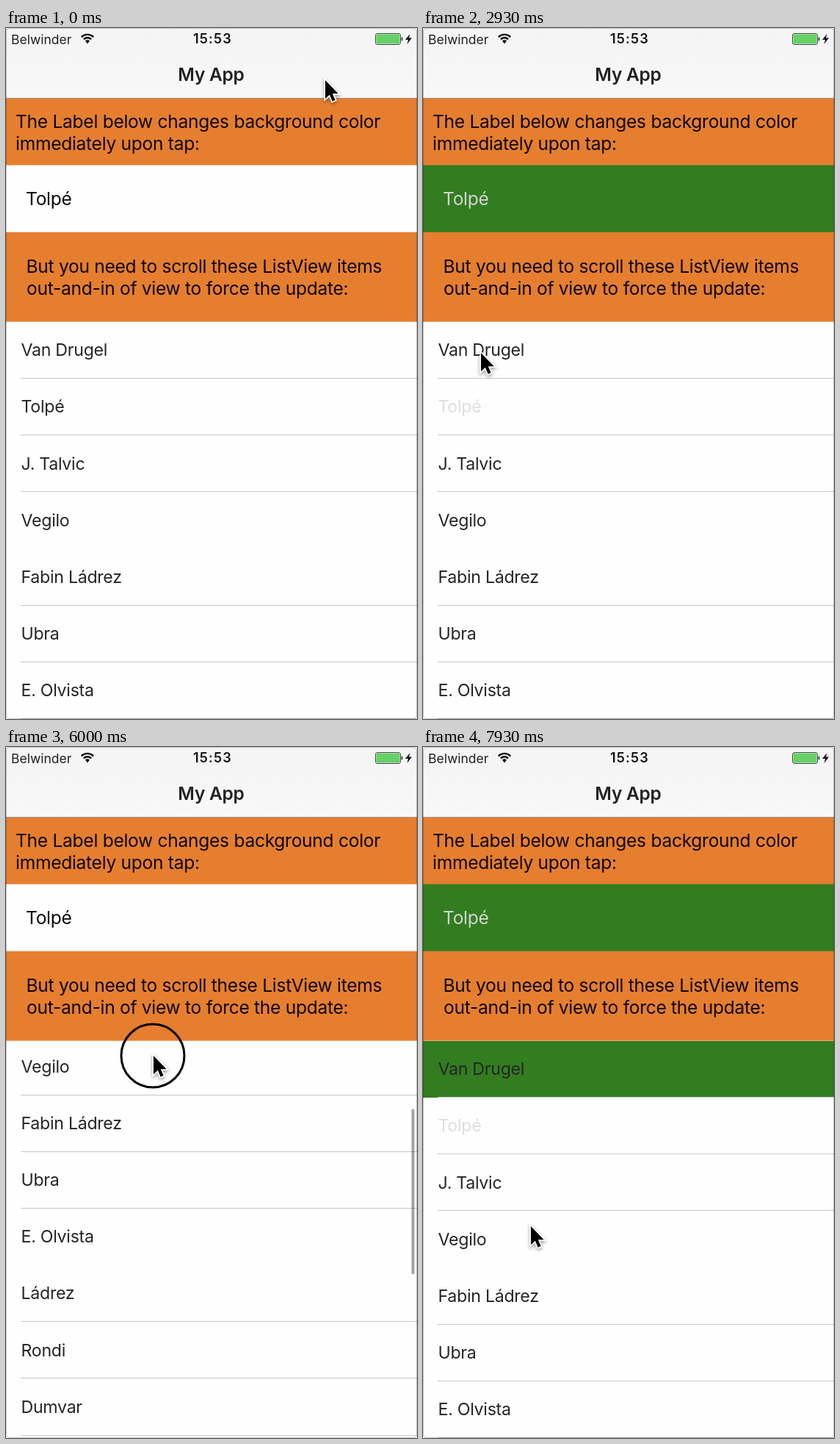
Animation of 560x940 px, one loop 8 s. Source, as an HTML page with a canvas:

```html
<!DOCTYPE html>
<html lang="en">
<head>
<meta charset="utf-8">
<title>My App</title>
<style>
  html, body { margin: 0; width: 100%; height: 100%; overflow: hidden; background: #fff; }
  canvas { display: block; width: 560px; height: 940px; }
</style>
</head>
<body>
<canvas id="stage" width="560" height="940"></canvas>
<script>
const ctx = document.getElementById('stage').getContext('2d');
const W = 560, H = 940, LOOP = 8000, STEP = 1000 / 15;
const ORANGE = '#e67e2f', GREEN = '#327d20', INK = '#252525', FADED = '#dedede', PALE = '#d3d6d0';
const BAR_END = 96, LABEL_TOP = 186.6, HINT_TOP = 277.7, LIST_TOP = 399.7, ROW = 77.17;
const players = ['Van Drugel', 'Tolpé', 'J. Talvic', 'Vegilo', 'Fabin Ládrez',
                 'Ubra', 'E. Olvista', 'Ládrez', 'Rondi', 'Dumvar'];

// Where the pointer rests, and when it sets off for each place
const home = { x: 435, y: 71 };
const grip = { at: 4560, x: 190, y: 666 };
const moves = [
  { at: 700, x: 68, y: 224 },
  { at: 2200, x: 79, y: 442 },
  grip,
  { at: 5270, x: 201, y: 420 },
  { at: 6060, x: 185, y: 710 },
  { at: 7000, x: 128, y: 513 },
  { at: 7530, x: 147, y: 652 }
];
const taps = [{ at: 1800, row: 1 }, { at: 3730, row: 0 }, { at: 7350, row: 1 }];
const TAP = 130;
const drag = { press: 5130, start: 5270, end: 6500, slop: 11, rubber: 0.53 };

const clamp = v => Math.min(1, Math.max(0, v));
const smooth = v => v * v * (3 - 2 * v);

function pointerAt(t) {
  let from = home, pos = home;
  for (const to of moves) {
    if (t < to.at) break;
    const dx = to.x - from.x, dy = to.y - from.y;
    const k = smooth(clamp((t - to.at) / (150 + 0.9 * Math.hypot(dx, dy))));
    pos = { x: from.x + dx * k, y: from.y + dy * k };
    from = to;
  }
  return pos;
}

// Positive: scrolled down; negative: pulled past the top
function scrollAt(t) {
  if (t < drag.start) return 0;
  const held = Math.min(t, drag.end);
  const moved = grip.y - pointerAt(held).y - drag.slop * clamp((held - drag.start) / 400);
  const offset = moved > 0 ? moved : moved * drag.rubber;
  const s = (t - held) / 75;
  return offset * (1 + s) * Math.exp(-s);
}

function selectedAt(t) {
  return taps.reduce((row, tap) => t >= tap.at + TAP ? tap.row : row, -1);
}

function isPressed(t) {
  return t >= drag.press && t < drag.end || taps.some(({ at }) => t >= at && t < at + TAP);
}

function rect(x, y, w, h, color) {
  ctx.fillStyle = color;
  ctx.fillRect(x, y, w, h);
}

function roundRect(x, y, w, h, r) {
  ctx.beginPath();
  ctx.roundRect(x, y, w, h, r);
}

function text(str, x, y, size, color, weight = 400, spacing = -0.3, align = 'left') {
  ctx.font = `${weight} ${size}px Inter, Roboto, sans-serif`;
  ctx.letterSpacing = spacing + 'px';
  ctx.textAlign = align;
  ctx.fillStyle = color;
  ctx.fillText(str, x, y);
}

function drawWifi(x, y) {
  const wave = r => ctx.arc(x, y, r, -Math.PI * 0.75, -Math.PI * 0.25);
  ctx.strokeStyle = ctx.fillStyle = '#111';
  ctx.lineWidth = 2.4;
  for (const r of [7.2, 11.6]) {
    ctx.beginPath();
    wave(r);
    ctx.stroke();
  }
  ctx.beginPath();
  ctx.moveTo(x, y + 1);
  wave(4.2);
  ctx.fill();
}

const bolt = new Path2D('M550.5 8 L544 16 H548 L546.5 22 L553 13.5 H549 Z');

function drawBattery() {
  ctx.lineWidth = 1;
  ctx.strokeStyle = ctx.fillStyle = '#4a4a4a';
  roundRect(503.5, 7.5, 34, 15, 2.5);
  ctx.stroke();
  roundRect(538.5, 12.5, 2, 5, 1);
  ctx.fill();
  rect(504.5, 8.5, 32, 13, '#66d166');
  ctx.fillStyle = '#111';
  ctx.fill(bolt);
}

function drawBar() {
  const shade = ctx.createLinearGradient(0, 0, 0, BAR_END);
  shade.addColorStop(0, '#f4f4f4');
  shade.addColorStop(1, '#f8f8f8');
  rect(0, 0, W, BAR_END, shade);
  rect(0, BAR_END - 1, W, 1, '#a29a94');
  text('Belwinder', 7, 21.5, 17.5, '#222', 400, 0);
  text('15:53', 281.5, 21.3, 18.2, '#151515', 600, 1.1, 'center');
  text('My App', 279.5, 72, 24.6, '#222', 600, -0.3, 'center');
  drawWifi(111, 20.5);
  drawBattery();
}

function drawHeader(selected) {
  const on = selected === 1;
  const line = (str, x, y) => text(str, x, y, 24.6, '#0c0703');
  rect(0, BAR_END, W, LIST_TOP - BAR_END, ORANGE);
  rect(0, LABEL_TOP, W, HINT_TOP - LABEL_TOP, on ? GREEN : '#fefefe');
  line('The Label below changes background color', 13, 136);
  line('immediately upon tap:', 13, 166);
  text(players[1], 27, 241, 24.6, on ? PALE : '#0a0a0a');
  line('But you need to scroll these ListView items', 27.5, 333);
  line('out-and-in of view to force the update:', 28, 363);
}

function drawList(t, selected) {
  const scroll = scrollAt(t);
  // The first row only picks up its new look after leaving the view
  const recycled = t >= drag.start + 330;
  ctx.save();
  ctx.beginPath();
  ctx.rect(0, LIST_TOP, W, H - LIST_TOP);
  ctx.clip();
  rect(0, LIST_TOP, W, H - LIST_TOP, '#fefefe');

  players.forEach((name, i) => {
    const top = LIST_TOP + i * ROW - scroll;
    const edge = Math.round(top + ROW - 0.8);
    const green = i === 0 && recycled;
    if (green) rect(0, Math.round(top), W, edge + 1 - Math.round(top), GREEN);
    const color = i !== selected ? INK : green ? PALE : FADED;
    text(name, 20.5, top + 46.5, 23.2, color);
    // Thin lines vanish in this band of the scaled screen
    if (edge < 695 || edge > 745) rect(20, edge, W - 20, 1, green ? '#d5d8d3' : '#c6c6c8');
  });

  const alpha = 0.36 * clamp((t - drag.start) / 130) * clamp((7250 - t) / 250);
  ctx.fillStyle = `rgba(0,0,0,${alpha})`;
  roundRect(552.5, 403.5 + Math.max(0, scroll) * 0.378, 4, 225 + Math.min(0, scroll), 2);
  ctx.fill();
  ctx.restore();
}

function drawBorder() {
  ctx.strokeStyle = 'rgba(0,0,0,0.22)';
  ctx.lineWidth = 1;
  roundRect(0.5, 0.5, W - 1, H - 1, 4);
  ctx.stroke();
}

const arrow = new Path2D('M0 0 V16 L3.7 12.5 L6.1 18.2 L8.6 17.1 L6.2 11.5 H11.2 Z');

function drawPointer(t) {
  const { x, y } = pointerAt(t);
  if (isPressed(t)) {
    ctx.strokeStyle = '#000';
    ctx.lineWidth = 3;
    ctx.beginPath();
    ctx.arc(x - 1, y, 43, 0, Math.PI * 2);
    ctx.stroke();
  }
  ctx.save();
  ctx.translate(x, y);
  ctx.scale(1.58, 1.58);
  ctx.lineWidth = 2.2;
  ctx.strokeStyle = '#fff';
  ctx.shadowColor = 'rgba(0,0,0,0.4)';
  ctx.shadowBlur = 4;
  ctx.shadowOffsetY = 2;
  ctx.stroke(arrow);
  ctx.shadowColor = 'transparent';
  ctx.fillStyle = '#000';
  ctx.fill(arrow);
  ctx.restore();
}

function draw(now) {
  // The picture advances 15 times per second
  const t = Math.floor((now % LOOP + 4) / STEP) * STEP % LOOP;
  const selected = selectedAt(t);
  rect(0, 0, W, H, '#fff');
  drawBar();
  drawHeader(selected);
  drawList(t, selected);
  drawBorder();
  drawPointer(t);
}

const start = performance.now();
function tick() {
  draw(performance.now() - start);
  requestAnimationFrame(tick);
}
tick();
</script>
</body>
</html>
```
